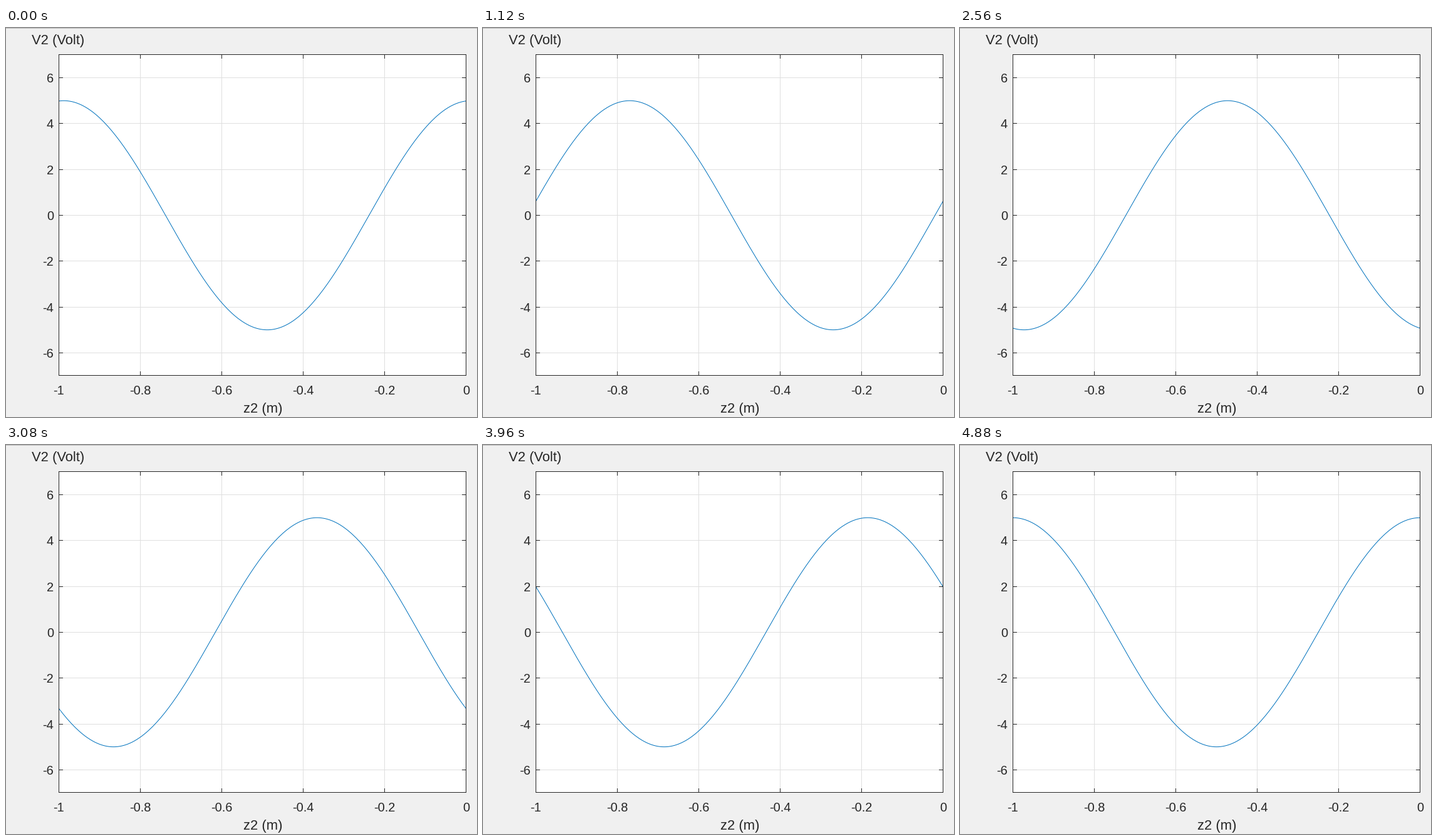
A matplotlib script that plays this animation: 752x622 px, repeating every 4.92 s.

```python
import numpy as np
import matplotlib.pyplot as plt
from matplotlib.animation import FuncAnimation

W, H, DPI = 752, 622, 100
FRAMES, INTERVAL = 123, 40
PT = 72 / DPI
LEFT, RIGHT, TOP, BOTTOM = 84, 734, 42, 555
INK, GRID, BLUE = "#262626", "#dfdfdf", "#0072bd"

plt.rcParams["font.family"] = "Liberation Sans"
fig = plt.figure(figsize=(W / DPI, H / DPI), dpi=DPI, facecolor="#f0f0f0")
ax = fig.add_axes([0, 0, 1, 1])
ax.set_xlim(0, W)
ax.set_ylim(H, 0)
ax.axis("off")


def px(z):
    return RIGHT + z * (RIGHT - LEFT)


def py(v):
    return 298.95 - 36.64 * v


def rect(x, y, w, h, color, z):
    ax.add_patch(plt.Rectangle((x, y), w, h, fc=color, lw=0, aa=False, zorder=z))


def hline(x0, x1, y, color, z):
    rect(x0, y, x1 - x0 + 1, 1, color, z)


def vline(x, y0, y1, color, z):
    rect(x, y0, 1, y1 - y0 + 1, color, z)


def label(x, y, text, size, ha):
    ax.text(x, y, text, fontsize=size * PT, color=INK, ha=ha, va="baseline")


hline(0, W, 0, "#bebebe", 0)
rect(LEFT, TOP, RIGHT - LEFT + 1, BOTTOM - TOP + 1, "white", 0)

for z in (-1, -0.8, -0.6, -0.4, -0.2, 0):
    x = round(px(z))
    vline(x, TOP, BOTTOM, GRID, 1)
    vline(x, TOP, TOP + 6, INK, 4)
    vline(x, BOTTOM - 6, BOTTOM, INK, 4)
    label(x + 0.5, 586, f"{z:g}", 20, "center")

for v in range(-6, 7, 2):
    y = round(py(v))
    hline(LEFT, RIGHT, y, GRID, 1)
    hline(LEFT, LEFT + 6, y, INK, 4)
    hline(RIGHT - 6, RIGHT, y, INK, 4)
    label(76, y + 8, str(v), 20, "right")

for y in (TOP, BOTTOM):
    hline(LEFT, RIGHT, y, INK, 4)
for x in (LEFT, RIGHT):
    vline(x, TOP, BOTTOM, INK, 4)

label(410.5, 615, "z2 (m)", 22, "center")
label(41, 26, "V2 (Volt)", 22, "left")

z = np.linspace(-1, 0, 201)
wave, = ax.plot([], [], color=BLUE, lw=PT, zorder=3)

# The wave travels one wavelength per loop, a little slower at both ends.
KEYS = [0, 28, 44, 64, 89, 110, 122]
SHIFT = [0.0117, 0.2303, 0.3612, 0.5273, 0.7325, 0.9057, 1.0]


def draw(i):
    shift = np.interp(i, KEYS, SHIFT)
    v = 5 * np.cos(2 * np.pi * (z - shift))
    wave.set_data(px(z) + 0.5, py(v) + 0.5)
    return wave,


anim = FuncAnimation(fig, draw, frames=FRAMES, interval=INTERVAL,
                     repeat=True, repeat_delay=0)
plt.show()
```
